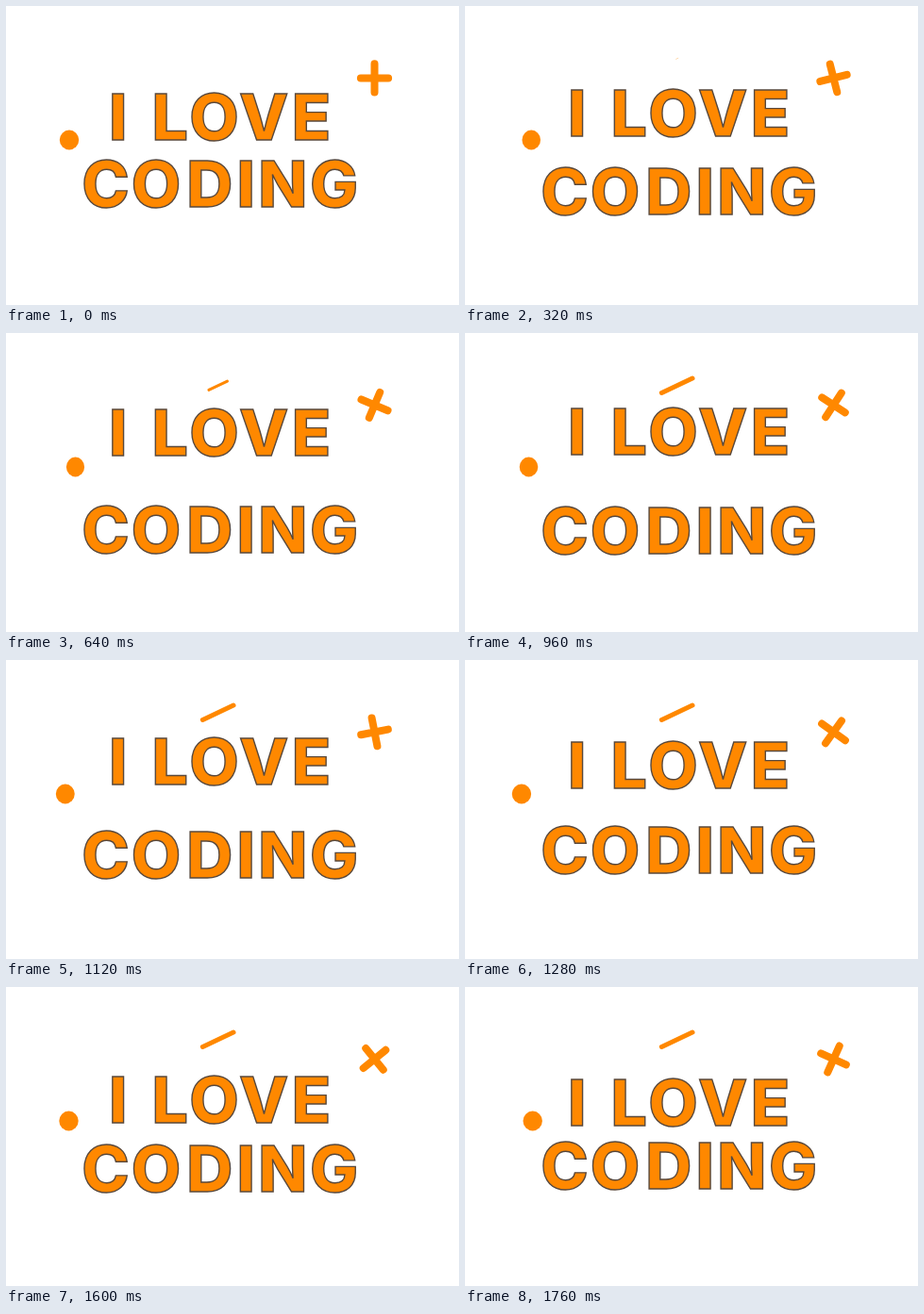
Write an HTML page that moves like this. It is 480 px wide and 317 px high and loops after 1.8 s.

```html
<!DOCTYPE html>
<html lang="en">
<head>
<meta charset="utf-8">
<title>I love coding</title>
<style>
  html, body { margin: 0; width: 100%; height: 100%; overflow: hidden; background: #fff; }
  svg { display: block; width: 480px; height: 317px; }
  text {
    font-family: Inter, "Open Sans", sans-serif;
    font-weight: 800;
    fill: #ff8800;
    stroke: #58483c;
    stroke-width: 1.4;
    white-space: pre;
  }
  .bar { fill: none; stroke: #ff8800; stroke-linecap: round; }
</style>
</head>
<body>
<svg viewBox="0 0 480 317">
  <ellipse id="dot" cy="142" ry="10.4" fill="#ff8800"/>
  <path id="slash" class="bar" stroke-width="5" d="M-16.3 7.7L16.3 -7.7"/>
  <path id="plus" class="bar" stroke-width="8" d="M-14.6 0H14.6M0 -15.2V15.2"/>
  <text id="top">I LOVE</text>
  <text id="bottom">CODING</text>
</svg>
<script>
const LOOP = 1800, STEP = 40, CAP = 49;
const el = id => document.getElementById(id);

const progress = (t, from, to) => Math.min(Math.max((t - from) / (to - from), 0), 1);
const ease = u => (1 - Math.cos(Math.PI * u)) / 2;
const glide = (t, t0, t1, a, b) => a + (b - a) * ease(progress(t, t0, t1));

// The two lines part until TURN, then close again; the loop cuts in before CLOSE
const TURN = 820, CLOSE = 1860;
const swing = (t, a, b, c) => t < TURN ? glide(t, 0, TURN, a, b) : glide(t, TURN, CLOSE, b, c);

function dotX(t) {
  if (t < 640) return glide(t, 0, 640, 67, 73.5);
  if (t < 1340) return glide(t, 640, 1340, 73.5, 59.7);
  return glide(t, 1340, 1840, 59.7, 72.5);
}

// Size a line by cap height and centre each letter's ink on its position
function setLine(id, centres) {
  const node = el(id), ctx = document.createElement("canvas").getContext("2d");
  ctx.font = '800 68px Inter, "Open Sans", sans-serif';
  const scale = CAP / ctx.measureText("I").actualBoundingBoxAscent;
  const xs = [...node.textContent].map((ch, i) => {
    const m = ctx.measureText(ch);
    const mid = (m.actualBoundingBoxRight - m.actualBoundingBoxLeft) / 2;
    return (centres[i] - mid * scale).toFixed(2);
  });
  node.setAttribute("font-size", 68 * scale);
  node.setAttribute("x", xs.join(" "));
}

function draw(t) {
  const place = (id, value) => el(id).setAttribute("transform", value);
  place("top", `translate(0 ${swing(t, 142.4, 128, 147.3)})`);
  place("bottom", `translate(0 ${swing(t, 213.3, 235.3, 213.3)})`);
  place("plus", `translate(390.5 76.4) rotate(${glide(t, 60, 2100, 0, -360)})`);

  el("dot").setAttribute("cx", dotX(t));
  el("dot").setAttribute("rx", 10.2 - 0.6 * Math.sin(Math.PI * progress(t, 0, 1280)));

  const grow = progress(t, 280, 880);
  place("slash", `translate(224.7 55.8) scale(${grow})`);
  el("slash").setAttribute("visibility", grow ? "visible" : "hidden");
}

setLine("top", [118.5, 140, 174.4, 220.3, 273, 323.8]);
setLine("bottom", [105.2, 158.7, 216.3, 254, 293.3, 347.5]);

const start = performance.now();
function tick() {
  const t = (performance.now() - start) % LOOP;
  draw(Math.floor(t / STEP) * STEP);
  requestAnimationFrame(tick);
}
draw(0);
requestAnimationFrame(tick);
</script>
</body>
</html>
```
